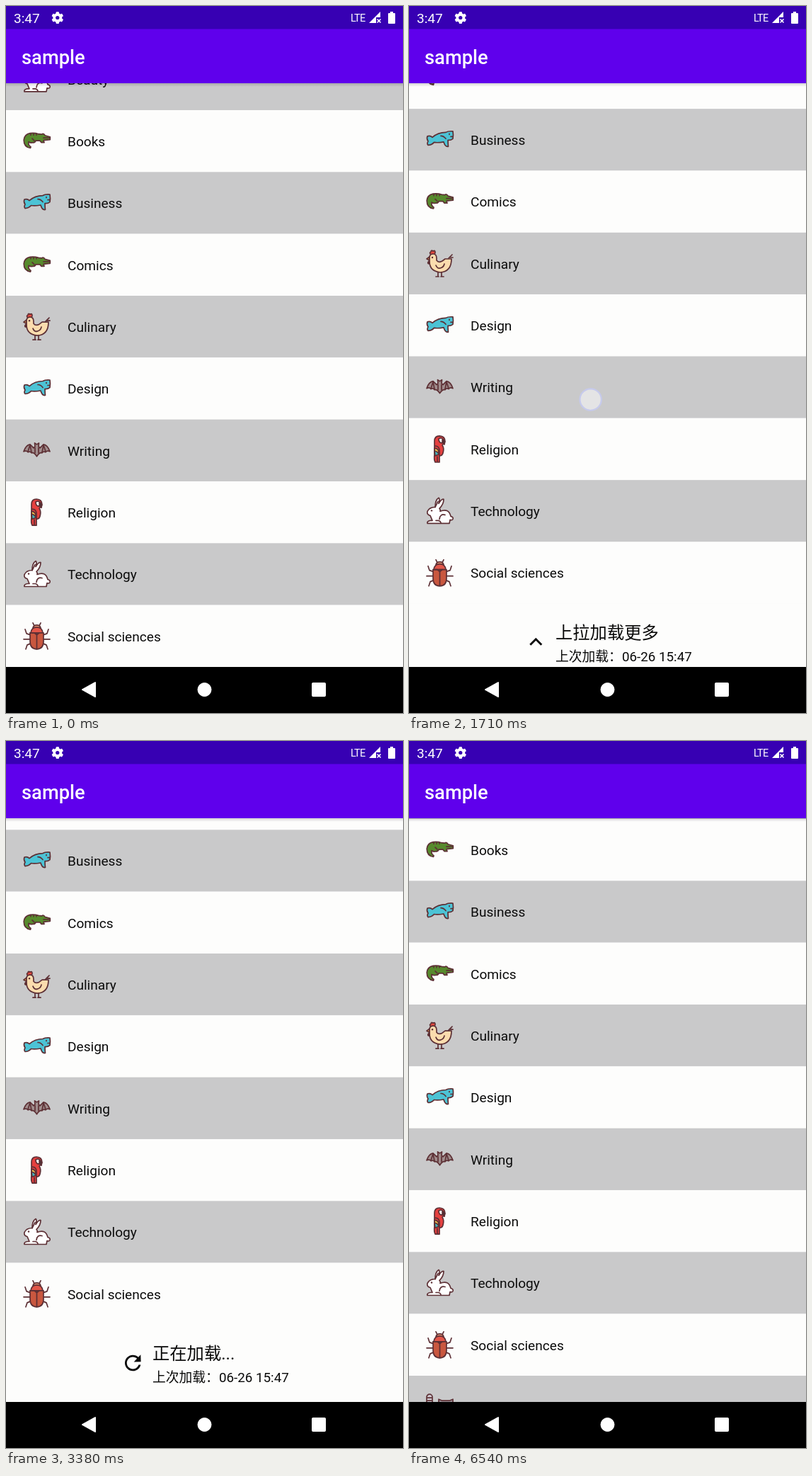
Animation of 561 by 998 pixels, one loop 6580 ms. Source, as an HTML page:

```html
<!DOCTYPE html>
<html lang="zh-CN">
<head>
<meta charset="utf-8">
<title>sample</title>
<style>
  html, body { margin: 0; width: 100%; height: 100%; overflow: hidden; background: #fdfdfc; }
  svg { display: block; }
  text { font-family: Roboto, "Noto Sans CJK SC", "Noto Sans CJK", sans-serif; white-space: pre; }
  .row { font-size: 19.1px; fill: #0c0c0c; }
  .icon * { stroke: #5d3035; stroke-width: 1.7; stroke-linejoin: round; stroke-linecap: round; }
  .icon .bare { stroke: none; }
  .icon .line { fill: none; }
</style>
</head>
<body>
<svg width="561" height="998" viewBox="0 0 561 998">
  <defs>
    <linearGradient id="shade" x2="0" y2="1">
      <stop offset="0" stop-opacity=".16"/>
      <stop offset="1" stop-opacity="0"/>
    </linearGradient>
  </defs>
  <rect width="561" height="998" fill="#fdfdfc"/>

  <g id="list">
    <g id="footer" fill="#0a0a0a">
      <text id="label" x="207" y="982" font-size="24.3"></text>
      <text x="207" y="1014" font-size="18.8">上次加载：06-26 15:47</text>
      <g transform="translate(179.3 987)">
        <path id="arrow" d="M-8 4 L0 -4 L8 4" fill="none" stroke="#0a0a0a" stroke-width="2.9"/>
        <g id="spinner">
          <path transform="scale(1.42) translate(-12 -12)" d="M17.65 6.35C16.2 4.9 14.21 4 12 4c-4.42 0-7.99 3.58-7.99 8s3.57 8 7.99 8c3.73 0 6.84-2.55 7.73-6h-2.08c-.82 2.33-3.04 4-5.65 4-3.31 0-6-2.69-6-6s2.69-6 6-6c1.66 0 3.14.69 4.22 1.78L13 11h7V4z"/>
        </g>
      </g>
    </g>
    <g id="rows"></g>
  </g>

  <circle id="touch" r="15.2" fill="#fff" fill-opacity=".5" stroke="#c6caec" stroke-width="2.2"/>

  <rect y="109" width="561" height="5" fill="url(#shade)"/>
  <rect y="32" width="561" height="77" fill="#5f00ec"/>
  <rect width="561" height="32.5" fill="#3700b3"/>
  <text x="22" y="81.5" font-size="27.3" font-weight="500" fill="#fff">sample</text>

  <g fill="#fff">
    <text x="11" y="24" font-size="19.1">3:47</text>
    <g transform="translate(72.8 16.6)">
      <g id="teeth"></g>
      <circle r="4.6" fill="none" stroke="#fff" stroke-width="3.8"/>
    </g>
    <text x="487" y="22" font-size="14.4" letter-spacing="-.7">LTE</text>
    <path d="M529 8V16H523V24H513Z"/>
    <path d="M524.5 18.5L529.5 23.5M529.5 18.5L524.5 23.5" stroke="#fff" stroke-width="1.6"/>
    <path d="M543 8h4v2h2q1 0 1 1v13q0 1-1 1h-8q-1 0-1-1v-13q0-1 1-1h2z"/>
  </g>

  <rect y="933" width="561" height="65"/>
  <g fill="#fff" stroke="#fff" stroke-linejoin="round">
    <path d="M108 965L126 955V975Z" stroke-width="2"/>
    <circle cx="280.5" cy="965" r="9.5"/>
    <rect x="432.5" y="955.5" width="19" height="19" rx="1"/>
  </g>
</svg>

<script>
const LOOP = 6580, ROW = 87.33, TOP = 147;
const $ = id => document.getElementById(id);

const icons = {
  croc: `<path fill="#578a2d" d="M10 8.5Q2 10 1.2 18Q1.2 28 10.5 29.3L11 27.5Q7 25 8 20.5Q10 22.5 14 21.5Q17 22 18 19H24L26 21.5H30L29 18.5L38.3 17.5V13.5L31 11.5Q29 8 26.5 10L22 9.5Q16 7.5 10 8.5Z"/>
    <path class="line" d="M29 15H37M13 16L16 19M11 9V11M15 9V11M19 9V11" stroke-width="1.2"/>`,
  manatee: `<path fill="#4cc3d5" d="M2 14.5Q6 13 9 16Q17 9 28 9Q31 7 38 7.5Q39 13 38 18Q35 20.5 31 20Q31 24 31.5 29Q27 30 25 22.5Q16 24 11.5 23Q8 27 3 27Q1 25 3 21.5Q.5 18 2 14.5Z"/>
    <path class="line" d="M21 14Q25 14 28 18M33 11V12M35 15H38" stroke-width="1.2"/>`,
  hen: `<path class="line" d="M32 12L37 7M34 11L38 11"/>
    <path fill="#e5493f" d="M7 7Q4 4 7 3Q7 0 10 2Q13 0 13 4L12 7Z"/>
    <path fill="#f0a04b" d="M5 10L1 13L5 15Z"/>
    <path fill="#fbdcae" d="M5 17V10Q6 6 10 6Q15 6 15 12V15Q18 19 23 16L27 13H36Q36 31 20 32Q5 30 5 17Z"/>
    <path fill="#e5493f" d="M4 16Q1 20 5 20Z"/>
    <path class="line" d="M17 32V38M22 32V38M14 38H18M21 38H25M14 22Q16 27 20 26Q25 25 26 20"/>
    <circle class="bare" cx="9" cy="11" r="1.2" fill="#5d3035"/>`,
  bat: `<path fill="#a08c8c" d="M1 21Q4 12 10 11L15 16L17 14L16.5 9L19.5 11L22.5 9L22 14L24 16L29 11Q35 12 38 21Q34 19 32 22Q29 20 27 23Q23 22 19.5 28Q16 22 12 23Q10 20 7 22Q5 19 1 21Z"/>
    <path class="line" d="M10 12L12 22M10 12L7 21M29 12L27 22M29 12L32 21M17 16V23M22 16V23" stroke-width="1.2"/>`,
  parrot: `<path fill="#e5403f" d="M12 8Q12 1 19 .8Q27 1 27 9L23 14Q26 18 24 25Q23 29 19 29V38H13Q11 34 12 27Z"/>
    <path fill="#fff" d="M18 5Q22 2 25 7L22 11Q18 10 18 5Z"/>
    <path fill="#4a3036" d="M23 6Q28 6 26 13Q23 11 23 6Z"/>
    <path fill="#f6c54c" d="M12 18Q18 19 18 24L12 25Z"/>
    <path fill="#43b5bd" d="M12 22Q17 23 18 27L13 29Z"/>
    <path class="line" d="M13 15Q19 15 19 22V29M16 30V37"/>`,
  rabbit: `<path fill="#fff" d="M13 14Q13 4 18 1Q20 2 18 9Q22 2 25 3Q25 10 19 16Q21 18 20 20Q32 15 35 27Q39 28 38 31Q37 33 34 32L33 37H2Q1 34 6 33H9L6 26Q1 25 2 20Q5 14 13 14Z"/>
    <path class="line" d="M19 31Q20 23 27 25M21 36Q20 33 17 33H14M13 14L17 6"/>
    <circle class="bare" cx="8" cy="19" r="1.2" fill="#5d3035"/>`,
  beetle: `<path class="line" d="M11 18L5 16L3 10M28 18L34 16L36 10M10 24H1M29 24H38M11 30L6 32L4 38M28 30L33 32L35 38M16 5L14 1M23 5L25 1"/>
    <path fill="#f3a07c" d="M14 8Q15 4 19.5 4Q24 4 25 8Z"/>
    <path fill="#e2574a" d="M11 15Q12 7 19.5 7Q27 7 28 15Z"/>
    <path fill="#c9573f" d="M10 15H29V27Q29 38 19.5 38Q10 38 10 27Z"/>
    <path class="line" d="M19.5 15V38M10 15L16 15L19.5 18L23 15"/>`,
  raccoon: `<rect x="1" y="2" width="8" height="22" rx="4" fill="#cfc8d0"/>
    <path class="line" d="M2 7H8M2 11H8M2 15H8" stroke-width="2.4"/>
    <path fill="#9b8f96" d="M18 9L23 11H33L38 9V19Q36 27 28 27Q20 27 18 19Z"/>
    <path fill="#9b8f96" d="M8 37Q8 25 20 25H32V37Z"/>`
};

const items = [
  ["Beauty", "rabbit"], ["Books", "croc"], ["Business", "manatee"], ["Comics", "croc"],
  ["Culinary", "hen"], ["Design", "manatee"], ["Writing", "bat"], ["Religion", "parrot"],
  ["Technology", "rabbit"], ["Social sciences", "beetle"], ["Animals", "raccoon"]
];

$("rows").innerHTML = items.map(([name, icon], i) => `
  <g transform="translate(0 ${TOP + (i - 1) * ROW})">
    <rect width="561" height="${ROW}" fill="${i % 2 ? "#fdfdfc" : "#c9c9ca"}"/>
    <g class="icon" transform="translate(24 24.2)">${icons[icon]}</g>
    <text class="row" x="87" y="51">${name}</text>
  </g>`).join("");
const added = $("rows").lastElementChild;

$("teeth").innerHTML = [0, 60, 120].map(a =>
  `<rect x="-2.2" y="-8.4" width="4.4" height="16.8" rx="1" transform="rotate(${a})"/>`).join("") +
  `<circle r="3" fill="#3700b3"/>`;

const linear = p => p;
const easeOut = p => 1 - (1 - p) ** 3;
const smooth = p => (1 - Math.cos(Math.PI * p)) / 2;
const clamp = p => Math.min(1, Math.max(0, p));

// time, distance pulled up, easing towards the next step
const pull = [
  [0, 0, linear], [1300, 0, p => p ** 1.4], [1460, 33.3, linear], [1800, 109, linear],
  [2040, 225, easeOut], [2180, 234, easeOut], [2480, 109, linear],
  [5990, 109, easeOut], [6090, 45.3, linear], [6170, 45.3, linear],
  [6171, 37, linear], [LOOP, 37, linear]
];

function pulled(t) {
  const i = pull.findIndex((k, n) => n + 1 === pull.length - 1 || t < pull[n + 1][0]);
  const [t0, v0, ease] = pull[i], [t1, v1] = pull[i + 1];
  return v0 + (v1 - v0) * ease(clamp((t - t0) / (t1 - t0)));
}

const RELEASE = 2180, READY = 1800, DONE = 5450, APPEND = 6170;
const show = (el, on) => el.setAttribute("visibility", on ? "visible" : "hidden");

function draw(t) {
  const up = pulled(t);
  $("list").setAttribute("transform", `translate(0 ${-up})`);

  $("label").textContent = t < READY ? "上拉加载更多" : t < RELEASE ? "释放立即加载"
    : t < DONE ? "正在加载..." : "加载成功";
  show($("arrow"), t < RELEASE);
  show($("spinner"), t >= RELEASE && t < DONE);
  $("arrow").setAttribute("transform", `rotate(${180 * smooth(clamp((t - READY) / 300))})`);
  $("spinner").setAttribute("transform", `rotate(${(t - 3385) * 360 / 800})`);

  const appended = t >= APPEND;
  show($("footer"), true);
  $("footer").style.display = appended ? "none" : "";
  added.style.display = appended ? "" : "none";

  const drag = up - 33.3;
  show($("touch"), t >= 1260 && t < RELEASE);
  $("touch").setAttribute("cx", 254 + drag * 0.048);
  $("touch").setAttribute("cy", 664.5 - drag * 1.95);
}

function tick() {
  draw(performance.now() % LOOP);
  requestAnimationFrame(tick);
}
tick();
</script>
</body>
</html>
```
